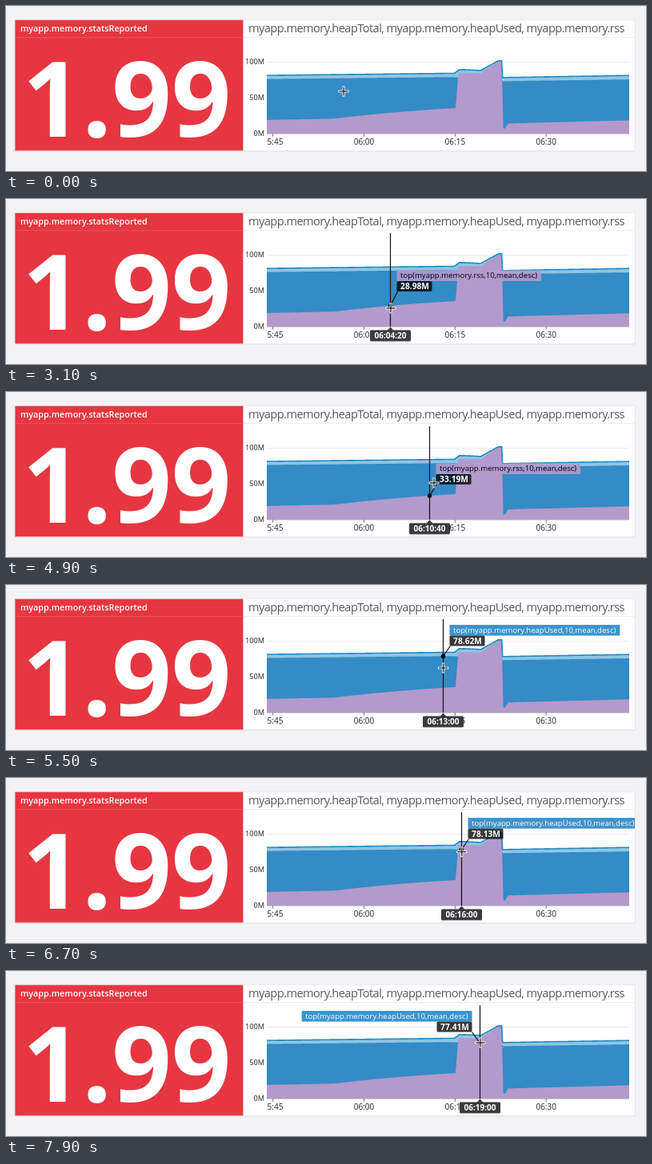
An HTML page with a canvas for the animation above (8000 ms loop, 800 px wide and 207 px high).

```html
<!DOCTYPE html>
<html lang="en">
<head>
<meta charset="utf-8">
<title>Memory dashboard</title>
<style>
html, body { margin: 0; width: 100%; height: 100%; overflow: hidden; background: #f3f2f5; }
canvas { display: block; width: 800px; height: 207px; }
</style>
</head>
<body>
<canvas id="stage"></canvas>
<script>
const W = 800, H = 207, LOOP = 8000, STEP = 100;
const RING_ON = 1500, HOVER_ON = 1900, LAG = 35;
const LEFT = 326, RIGHT = 779, BASE = 160, CARD_RIGHT = 786;
const FIRST = -49, LAST = 132;
const FONT = '"Open Sans", "Noto Sans", sans-serif';
const DARK = '#3b3b3d';

const canvas = document.getElementById('stage');
const ctx = canvas.getContext('2d');
const dpr = window.devicePixelRatio || 1;
canvas.width = W * dpr;
canvas.height = H * dpr;

const clamp = (v, lo, hi) => Math.min(hi, Math.max(lo, v));
const ramp = (v, from, to) => clamp((v - from) / (to - from), 0, 1);

// Chart samples are 20 s apart; sample 0 is 06:00:00. Values are in millions.
const xAt = n => 448.1 + n * 2.53;
const sampleAt = x => Math.round((x - 448.1) / 2.53);
const yAt = v => BASE - v * 0.9;

function rss(n) {
  const u = clamp(n + 15, 0, 60);
  return 18.9 + 1.9 * ramp(n, FIRST, -15) + 0.33417 * u - 0.0015 * u * u
    + 48.6 * ramp(n, 45, 46.4) + 16.6 * ramp(n, 57.5, 66)
    - 93.6 * ramp(n, 67.8, 68.6) + 7 * ramp(n, 69.5, 71) + 4.5 * ramp(n, 71, LAST);
}

function heapUsed(n) {
  const u = clamp(n - 42, 0, 25);
  return 76 + 2.71 * ramp(n, FIRST, 42) - 0.10333 * u + 0.00111 * u * u
    - 3.8 * ramp(n, 67.7, 68.4) + 2.5 * ramp(n, 68.4, LAST);
}

function heapTotal(n) {
  return 81 + 3 * ramp(n, FIRST, 44.5) + 5 * ramp(n, 44.5, 46.8) - ramp(n, 50, 57)
    + 13.2 * ramp(n, 57.5, 66) - 23.2 * ramp(n, 67.8, 68.2) + 3 * ramp(n, 68.2, LAST);
}

function pointerAt(t) {
  const dash = ramp(t, 4600, 4900), drift = ramp(t, 4900, 7900);
  const first = ramp(t, 300, 1300), second = ramp(t, 1900, 2600);
  return {
    x: 422 + 39 * first + 20 * second + 54 * dash + 58 * drift,
    y: 107 + 29 * first + second - 23 * dash - 24 * (1 - (1 - drift) ** 2.4)
  };
}

function rect(x, y, w, h, color) {
  ctx.fillStyle = color;
  ctx.fillRect(x, y, w, h);
}

function pill(x, y, w, h, color) {
  ctx.beginPath();
  ctx.roundRect(x, y, w, h, 1.5);
  ctx.fillStyle = color;
  ctx.fill();
}

function setFont(size, weight = 400, spacing = 0) {
  ctx.font = `${weight} ${size}px ${FONT}`;
  ctx.letterSpacing = spacing + 'px';
}

function text(str, x, y, color, align = 'left') {
  ctx.textAlign = align;
  ctx.fillStyle = color;
  ctx.fillText(str, x, y);
}

function line(x1, y1, x2, y2, color, width = 1) {
  ctx.beginPath();
  ctx.moveTo(x1, y1);
  ctx.lineTo(x2, y2);
  ctx.strokeStyle = color;
  ctx.lineWidth = width;
  ctx.stroke();
}

function circle(x, y, r) {
  ctx.beginPath();
  ctx.arc(x, y, r, 0, Math.PI * 2);
}

function clipped(x, y, w, h, draw) {
  ctx.save();
  ctx.beginPath();
  ctx.rect(x, y, w, h);
  ctx.clip();
  draw();
  ctx.restore();
}

function trace(series) {
  ctx.beginPath();
  for (let n = FIRST; n <= LAST; n += 0.2) ctx.lineTo(xAt(n), yAt(series(n)));
}

function area(series, fill) {
  trace(series);
  ctx.lineTo(xAt(LAST), BASE);
  ctx.lineTo(xAt(FIRST), BASE);
  ctx.fillStyle = fill;
  ctx.fill();
}

function outline(series, color, width) {
  trace(series);
  ctx.strokeStyle = color;
  ctx.lineWidth = width;
  ctx.stroke();
}

function drawPanels() {
  rect(0, 0, W, H, '#f3f2f5');
  rect(10.5, 17, 776, 165.5, '#e0dfe3');
  rect(11.4, 17.6, 774.4, 163.8, '#fff');
  rect(11.4, 17.6, 285, 163.8, '#e63641');
  rect(11.4, 39, 285, 1, '#e9505a');
  rect(297, 39, 489, 1, '#efeff1');
  setFont(10.8, 600);
  text('myapp.memory.statsReported', 18, 31.7, '#fff');
  setFont(130.6, 700);
  text('1.99', 20.4, 164.2, '#fff');
  setFont(14.6, 400, -0.56);
  text('myapp.memory.heapTotal, myapp.memory.heapUsed, myapp.memory.rss', 303, 33, '#59595c');
}

function drawChart() {
  line(LEFT, 70.5, RIGHT, 70.5, '#ececec');
  clipped(LEFT, 40, RIGHT - LEFT, BASE - 40, () => {
    area(heapTotal, '#8dc6e5');
    area(heapUsed, '#348bc5');
    area(rss, '#b39acc');
    outline(heapTotal, '#2288c2', 1.6);
  });
  line(LEFT, 160.5, RIGHT, 160.5, '#c9c9cc');
  setFont(9.2);
  for (let v = 0; v <= 100; v += 50) text(v + 'M', 323, yAt(v) + 2.9, '#222', 'right');
  setFont(10);
  clipped(LEFT, BASE, CARD_RIGHT - LEFT, 22, () => {
    ['05:45', '06:00', '06:15', '06:30'].forEach((label, i) => {
      const x = xAt((i - 1) * 45) - 0.6;
      line(x, 160, x, 164, '#777');
      text(label, x, 173.5, '#222', 'center');
    });
  });
}

function drawTooltip(x, value, onHeap) {
  const split = onHeap ? 63.5 : 103;
  const name = `top(myapp.memory.${onHeap ? 'heapUsed' : 'rss'},10,mean,desc)`;
  setFont(9.6, 500);
  const width = ctx.measureText(name).width + 9.5;
  const flipped = x + 8 + width > CARD_RIGHT + 10;
  const near = flipped ? x - 10 : x + 8;
  const left = flipped ? near - width : near;
  const box = flipped ? near - 44 : near;

  clipped(297, 18, CARD_RIGHT - 297, 164, () => {
    rect(left, split - 13.5, width, 13.5, onHeap ? 'rgba(47,143,205,0.94)' : 'rgba(179,154,206,0.88)');
    text(name, left + 4.5, split - 3.6, onHeap ? '#fff' : '#000');
    pill(box, split, 44, 13, 'rgba(0,0,0,0.78)');
    setFont(10.2, 700);
    text(value.toFixed(2) + 'M', box + 22.5, split + 10.2, '#fff', 'center');
  });
  line(x, yAt(value), flipped ? near : near + 1, split + 13, '#111', 1.2);
}

function drawTimeLabel(x, n) {
  const pad = v => String(v).padStart(2, '0');
  ctx.beginPath();
  ctx.moveTo(x - 4, 165);
  ctx.lineTo(x, 160.5);
  ctx.lineTo(x + 4, 165);
  ctx.fillStyle = DARK;
  ctx.fill();
  pill(x - 25.5, 164.5, 51, 14, DARK);
  setFont(10, 700);
  text(`06:${pad(Math.floor(n / 3))}:${pad(n % 3 * 20)}`, x, 175, '#fff', 'center');
}

function drawHover(t) {
  const n = sampleAt(pointerAt(t - LAG).x);
  const x = Math.floor(xAt(n)) + 0.5;
  const { y } = pointerAt(t);
  const distance = series => Math.abs(yAt(series(n)) - y);
  const onHeap = distance(heapUsed) < distance(rss);
  const value = (onHeap ? heapUsed : rss)(n);

  line(x, 43, x, BASE, '#111', 1.2);
  drawTooltip(x, value, onHeap);
  circle(x, yAt(value), 2.7);
  ctx.fillStyle = '#000';
  ctx.fill();
  drawTimeLabel(x, n);
}

function drawPointer(t) {
  const { x, y } = pointerAt(t);
  const ring = t >= RING_ON && t < HOVER_ON;
  for (const [color, cross, rim, arm] of [['#fff', 3, 5, 6.5], ['#111', 1.2, 2.6, 5.5]]) {
    line(x - arm, y, x + arm, y, color, cross);
    line(x, y - arm, x, y + arm, color, cross);
    if (!ring) continue;
    circle(x, y, 17.8);
    ctx.lineWidth = rim;
    ctx.stroke();
  }
}

const start = performance.now();

function frame() {
  const elapsed = (performance.now() - start) % LOOP;
  const t = Math.floor(elapsed / STEP) * STEP;
  ctx.setTransform(dpr, 0, 0, dpr, 0, 0);
  drawPanels();
  drawChart();
  if (t >= HOVER_ON) drawHover(t);
  drawPointer(t);
  requestAnimationFrame(frame);
}
frame();
</script>
</body>
</html>
```
